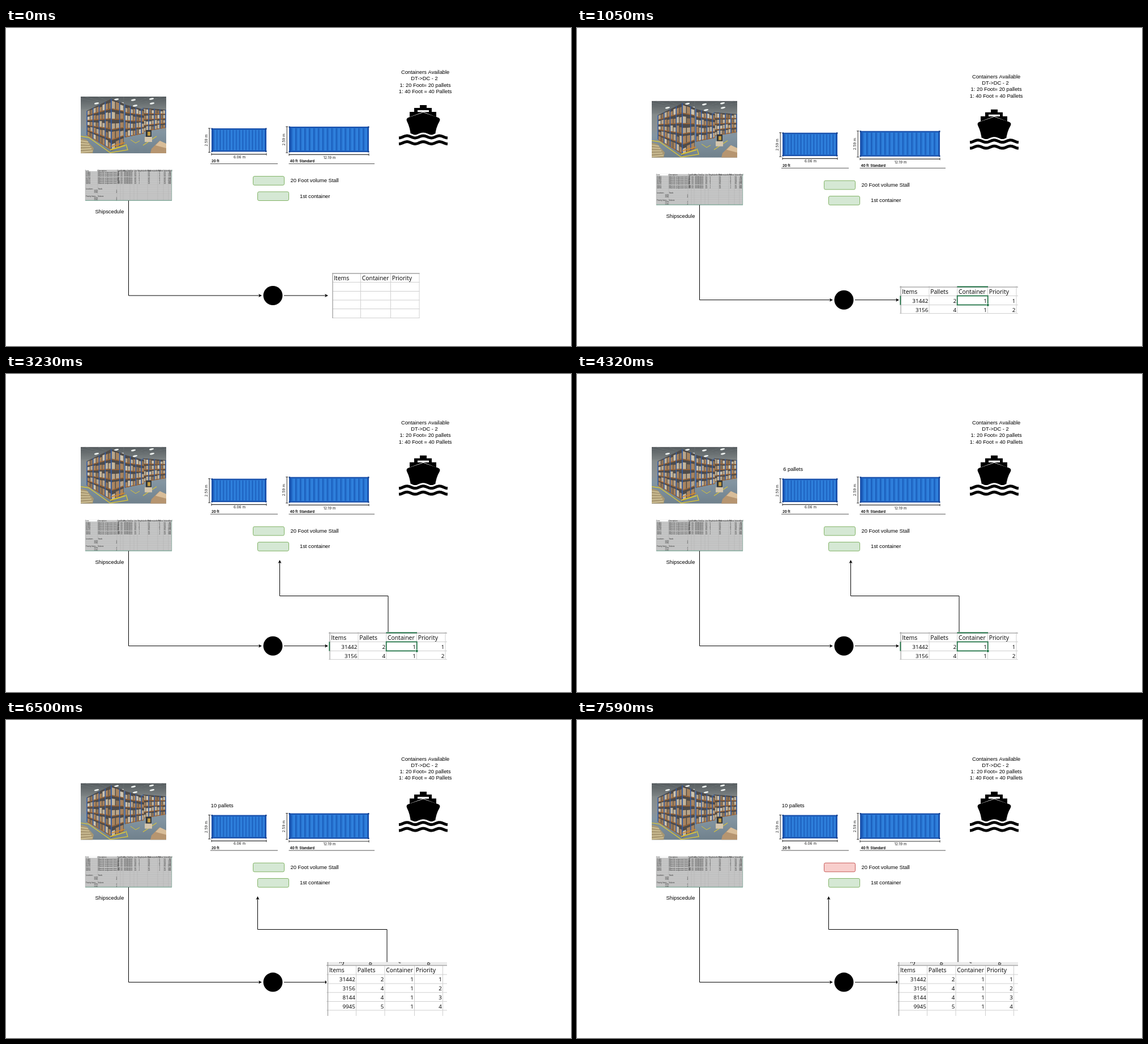
An HTML page with a canvas that plays this animation: 998 by 561 pixels, repeating every 8000 ms.

```html
<!DOCTYPE html>
<html lang="en">
<head>
<meta charset="utf-8">
<title>Container planning</title>
<style>
html, body { margin: 0; width: 100%; height: 100%; overflow: hidden; background: #fff; }
canvas { display: block; width: 100%; height: 100%; }
</style>
</head>
<body>
<canvas id="stage" width="998" height="561"></canvas>
<script>
const ctx = document.getElementById('stage').getContext('2d');
const LOOP = 8000;
const LABEL = '9.33px "Liberation Sans", Arial, sans-serif';
const HEAD = '10.4px "Open Sans", sans-serif';
const CELL = '9.8px "Open Sans", sans-serif';
const GRID = '#d0d0d0', EXCEL = '#217346';

// ---- helpers ----
function rect(x, y, w, h, color) {
  ctx.fillStyle = color;
  ctx.fillRect(x, y, w, h);
}
function trace(points) {
  ctx.beginPath();
  points.forEach(([x, y]) => ctx.lineTo(x, y));
}
function line(points, color = '#000', width = 1) {
  trace(points);
  ctx.strokeStyle = color;
  ctx.lineWidth = width;
  ctx.stroke();
}
function poly(points, color) {
  trace(points);
  ctx.closePath();
  ctx.fillStyle = color;
  ctx.fill();
}
function text(str, x, y, font = LABEL, align = 'left', color = '#000') {
  ctx.font = font;
  ctx.textAlign = align;
  ctx.fillStyle = color;
  ctx.fillText(str, x, y);
}
function arrow(points) {
  const [x, y] = points[points.length - 1], [px, py] = points[points.length - 2];
  const angle = Math.atan2(y - py, x - px);
  const back = [x - 4 * Math.cos(angle), y - 4 * Math.sin(angle)];
  line([...points.slice(0, -1), back]);
  ctx.save();
  ctx.translate(x, y);
  ctx.rotate(angle);
  poly([[0, 0], [-6, -3], [-4.4, 0], [-6, 3]], '#000');
  ctx.restore();
}
function randomizer(seed) {
  return () => (seed = (seed * 16807) % 2147483647) / 2147483647;
}
const mix = (a, b, t) => a + (b - a) * t;

// ---- warehouse picture ----
function rack([x0, top0, bottom0], [x1, top1, bottom1], cols, rows, random) {
  const at = (u, v) => [mix(x0, x1, u), mix(mix(top0, top1, u), mix(bottom0, bottom1, u), v)];
  const quad = (u, v, w, h) => [at(u, v), at(u + w, v), at(u + w, v + h), at(u, v + h)];
  const tones = ['#b9a58a', '#d0c4ae', '#a98560', '#c3b59c', '#8f7457'];
  poly(quad(0, 0, 1, 1), '#4f4b49');
  for (let r = 0; r < rows; r++) {
    for (let c = 0; c < cols; c++) {
      const low = 0.15 + random() * 0.25;
      const tone = tones[Math.floor(random() * tones.length)];
      poly(quad((c + 0.1) / cols, (r + low) / rows, 0.8 / cols, (0.9 - low) / rows), tone);
    }
    line([at(0, (r + 0.95) / rows), at(1, (r + 0.95) / rows)], '#a86a35', 1.3);
  }
  for (let c = 0; c <= cols; c += 2) line([at(c / cols, 0), at(c / cols, 1)], '#2f5fb0', 1.4);
}
function warehouse(x, y) {
  const random = randomizer(77);
  ctx.save();
  ctx.translate(x, y);
  ctx.beginPath();
  ctx.rect(0, 0, 151, 100);
  ctx.clip();
  const air = ctx.createLinearGradient(0, 0, 0, 100);
  air.addColorStop(0, '#4d5356');
  air.addColorStop(0.25, '#858b8b');
  air.addColorStop(0.5, '#8b9296');
  air.addColorStop(0.62, '#8395a2');
  air.addColorStop(1, '#70818c');
  rect(0, 0, 151, 100, air);
  for (let i = 0; i < 9; i++) {
    line([[75, 20], [i * 23 - 16, 0]], '#697073', 0.8);
    line([[0, i * 2.6], [151, i * 2.4]], '#737a7c', 0.6);
  }
  for (const [lx, ly] of [[72, 12], [63, 5], [126, 12], [125, 4], [96, 16], [28, 12], [93, 6]]) {
    ctx.beginPath();
    ctx.ellipse(lx, ly, 4.2, 1.5, -0.2, 0, 7);
    ctx.fillStyle = '#eef2f0';
    ctx.fill();
  }
  rack([110, 20, 62], [150, 23, 55], 8, 4, random);
  rack([78, 14, 72], [112, 23, 65], 7, 4, random);
  rack([11, 25, 68], [54, 4, 94], 8, 5, random);
  rack([54, 4, 96], [76, 12, 84], 3, 5, random);
  const yellow = '#d9c438';
  line([[0, 70], [14, 72], [52, 99], [83, 94], [80, 84]], yellow, 1.4);
  line([[52, 94], [79, 86]], yellow, 2);
  line([[54, 88], [78, 81]], '#d48a2c', 1.5);
  line([[88, 76], [97, 82], [104, 78]], yellow, 1);
  line([[110, 86], [134, 70]], yellow, 1.2);
  rect(115, 59, 10, 13, '#34373a');
  rect(118, 62, 5, 7, '#c39a3e');
  rect(113, 71, 13, 9, '#d4c6ad');
  poly([[0, 73], [10, 76], [23, 91], [21, 100], [0, 100]], '#a99872');
  for (let i = 0; i < 5; i++) line([[0, 78 + i * 5], [13 + i * 2, 80 + i * 4]], '#d0c297', 1.8);
  poly([[125, 92], [139, 78], [151, 84], [151, 100], [123, 100]], '#b69570');
  poly([[132, 86], [140, 78], [151, 83], [151, 91]], '#d8bd99');
  ctx.restore();
}

// ---- spreadsheet thumbnail ----
function schedule(x, y) {
  const pitch = 3.2, columns = [0, 22, 56, 62, 67, 79, 86, 92, 110, 128, 138, 147];
  const tiny = (str, tx, row, align) =>
    text(str, x + tx, y + row * pitch + 2.7, '2.8px "Open Sans", sans-serif', align, '#222');
  rect(x, y, 153, 54.5, '#c6c6c6');
  rect(x, y, 21, 2.8, '#fff');
  for (let r = 1; r < 18; r++) line([[x, y + r * pitch], [x + 153, y + r * pitch]], '#aeb2b0', 0.45);
  for (const c of columns) line([[x + c, y], [x + c, y + 54]], '#aeb2b0', 0.45);
  const heads = ['Item', 'Description', 'Type', 'Mode', 'Ship Date', 'Qty', 'Lbs', 'Weight/pallet (lbs)',
    'Volume/pallet (ft)', 'Pallets', 'Volume', 'Total'];
  heads.forEach((h, i) => tiny(h, columns[i] + 0.5, 0));
  for (let r = 1; r < 8; r++) {
    tiny(String(31000 + r * 442), 1, r);
    tiny('Material component item ' + r * 17, 22.5, r);
    tiny('DT', 57, r);
    tiny('DC', 62.5, r);
    tiny('08/08/2022', 68.5, r);
    columns.slice(6).forEach((c, i) => tiny(String(r * 31 % (i % 2 ? 9 : 97) + 1), c + 4, r, 'right'));
    tiny(String(r * 53 + 12), 151, r, 'right');
  }
  [[10, 'Locations', 'Totals'], [14, 'Priority Items', 'Volume']].forEach(([row, a, b]) => {
    tiny(a, 1, row);
    tiny(b, 22.5, row);
    for (let i = 1; i < 3; i++) {
      tiny(String(3156 + i * 97), 22, row + i, 'right');
      tiny(String(i * 2), 56, row + i, 'right');
    }
  });
  line([[x, y + 54.2], [x + 153, y + 54.2]], '#5d9b83', 0.9);
  line([[x + 152.7, y], [x + 152.7, y + 54]], '#7caa97', 0.7);
}

// ---- shipping container with its dimensions ----
function container(x, y, w, h, ribs, dims) {
  const dimFont = '6.5px Inter, sans-serif', gray = '#333';
  rect(x, y, w, h, '#1b53ae');
  rect(x + 3, y + 2.5, w - 6, h - 5, '#2f80dc');
  const pitch = (w - 6) / ribs;
  for (let i = 0; i < ribs; i++) {
    rect(x + 3 + i * pitch, y + 3, pitch * 0.28, h - 6, '#1c5fbd');
    rect(x + 3 + (i + 0.28) * pitch, y + 3, pitch * 0.2, h - 6, '#2670cc');
  }
  for (const px of [x - 0.5, x + w - 2]) {
    rect(px, y - 0.5, 2.5, 2.5, '#153f8a');
    rect(px, y + h - 2, 2.5, 2.5, '#153f8a');
  }
  const left = x - 3.8, below = y + h + 4.4;
  line([[left, y], [left, y + h + 1]], gray);
  line([[left - 2, y], [left + 2, y]], gray);
  line([[left - 2, y + h + 1], [left + 2, y + h + 1]], gray);
  line([[x, below], [x + w, below]], gray, 1.2);
  line([[x, below - 2], [x, below + 2]], gray);
  line([[x + w, below - 2], [x + w, below + 2]], gray);
  text(dims.length, x + w / 2 + 1, dims.lengthY, dimFont, 'center', '#222');
  ctx.save();
  ctx.translate(left - 3.3, y + h / 2 + 0.5);
  ctx.rotate(-Math.PI / 2);
  text('2.59 m', 0, 0, dimFont, 'center', '#222');
  ctx.restore();
  text(dims.name, dims.nameX, 237.4, 'bold 6px Inter, sans-serif', 'left', '#111');
  line([[dims.nameX - 2, 239.5], [dims.end, 239.5]], '#555', 1);
}

// ---- ship ----
function wave(y, color, width) {
  const points = [];
  for (let x = 694; x <= 780; x++) points.push([x, y - 1.9 * Math.cos((x - 694) / 86 * 6 * Math.PI + Math.PI)]);
  line(points, color, width);
}
function ship() {
  poly([[731, 136], [743, 136], [743, 141], [752, 141], [752, 148], [760, 148], [760, 157],
    [737, 148], [713, 157], [713, 148], [721, 148], [721, 141], [731, 141]], '#000');
  rect(727, 145, 20, 3.2, '#fff');
  ctx.fillStyle = '#000';
  ctx.fill(new Path2D('M737 149 L762 157.5 Q768 159 766 164 Q759 176 758 190 H715 Q714 176 708 164 Q706 159 712 157.5Z'));
  wave(190.5, '#fff', 8);
  wave(192, '#000', 5);
  wave(202.5, '#000', 5);
}

function badge(x, y, fill, stroke) {
  ctx.beginPath();
  ctx.roundRect(x, y, 55, 15.6, 2.4);
  ctx.fillStyle = fill;
  ctx.fill();
  ctx.strokeStyle = stroke;
  ctx.lineWidth = 1;
  ctx.stroke();
}

function diagram({ label, stalled }) {
  ['Containers Available', 'DT->DC - 2', '1: 20 Foot= 20 pallets', '1: 40 Foot = 40 Pallets']
    .forEach((str, i) => text(str, i === 1 ? 739 : 740.6, 81.2 + i * 11.2, LABEL, 'center'));
  ship();
  warehouse(132, 121);
  schedule(140, 250);
  text('Shipscedule', 157.5, 326.8);
  container(363, 177, 97, 41.3, 16, { length: '6.06 m', lengthY: 229.6, name: '20 ft', nameX: 363, end: 480 });
  container(500, 174, 141, 45, 17, { length: '12.19 m', lengthY: 230.8, name: '40 ft  Standard', nameX: 501.5, end: 651 });
  if (label) text(label, 381.7, 163, LABEL, 'center');
  badge(436.5, 261.6, stalled ? '#f8cecc' : '#d5e8d4', stalled ? '#c85a58' : '#82b366');
  badge(444.5, 288.9, '#d5e8d4', '#82b366');
  text('20 Foot volume Stall', 502.6, 272.3);
  text('1st container', 519, 299.6);
  arrow([[216.5, 304.5], [216.5, 472], [452, 472]]);
  ctx.beginPath();
  ctx.arc(471.5, 472, 17, 0, 7);
  ctx.fillStyle = '#000';
  ctx.fill();
  arrow([[491, 472], [569, 472]]);
}

// ---- result tables ----
const FULL = ['Items', 'Pallets', 'Container', 'Priority'];
function table({ box: [x0, y0, x1, y1], cols, rows, heads, data = [] }) {
  rect(x0, y0, x1 - x0, y1 - y0, '#fff');
  for (const c of cols) line([[c, y0], [c, y1]], GRID);
  for (const r of rows) line([[x0, r], [x1, r]], GRID);
  heads.forEach((h, i) => text(h, cols[i] + 2.2, rows[0] + 12.4, HEAD));
  data.forEach((record, r) => record.forEach((value, i) =>
    text(value, cols[i + 1] - 1.7, rows[r + 1] + 12.2, CELL, 'right')));
}
function emptyTable() {
  table({ box: [576.5, 432, 730.5, 512], cols: [577, 626.5, 679.5, 730],
    rows: [433, 448.5, 464.5, 480, 495.5, 511.5], heads: ['Items', 'Container', 'Priority'] });
  line([[576.5, 433], [730.5, 433]], '#8a8a8a', 1.2);
  line([[577, 432], [577, 512]], '#9a9a9a', 1);
}
function twoRowTable() {
  table({ box: [570, 455, 779, 504], cols: [572, 622, 671.7, 725.5, 776], rows: [457, 472.5, 488.5, 503.5],
    heads: FULL, data: [[31442, 2, 1, 1], [3156, 4, 1, 2]] });
  line([[570, 457], [779, 457]], '#9a9a9a', 1.2);
  line([[572, 455], [572, 504]], '#a5a5a5', 1);
  line([[671.5, 456.5], [726, 456.5]], EXCEL, 1.8);
  line([[571.3, 472.5], [571.3, 488.5]], EXCEL, 1.8);
  ctx.strokeRect(671.7, 472.5, 54, 16);
  rect(723, 486, 5, 5, '#fff');
  rect(723.7, 486.7, 3.8, 3.8, EXCEL);
}
function oneRowTable() {
  table({ box: [569, 464, 787, 500], cols: [576, 626.5, 676.5, 728.8, 779.5], rows: [468, 483.5, 498],
    heads: FULL, data: [[31442, 2, 1, 1]] });
  rect(569, 464, 7, 19, '#e3e3e3');
  rect(569, 483.5, 7, 15.5, '#9fd2b5');
  line([[576, 467.7], [787, 467.7]], EXCEL, 1.6);
  line([[575, 498.3], [787, 498.3]], EXCEL, 1.8);
  line([[576, 467], [576, 499]], '#6ea488', 1);
}
function fourRowTable() {
  const cols = [568.5, 618.5, 669, 721.5, 771.5];
  table({ box: [566, 427, 779, 522], cols, rows: [433, 449, 465, 480.7, 496.5, 512], heads: FULL,
    data: [[31442, 2, 1, 1], [3156, 4, 1, 2], [8144, 4, 1, 3], [9945, 5, 1, 4]] });
  rect(566, 427, 213, 6, '#ececec');
  ctx.save();
  ctx.beginPath();
  ctx.rect(566, 427.3, 213, 5);
  ctx.clip();
  ['xy', 'g', 'c', 'g'].forEach((c, i) => text(c, (cols[i] + cols[i + 1]) / 2, 428.8, HEAD, 'center'));
  ctx.restore();
  line([[566, 433], [779, 433]], '#8f8f8f', 1.2);
  line([[568.5, 427], [568.5, 522]], '#8f8f8f', 1);
}

// ---- timeline ----
const one = { shift: 10.9, table: oneRowTable, route: [[678.5, 464], [678.5, 394], [444.5, 394], [444.5, 323]] };
const two = { shift: 7.7, table: twoRowTable, route: [[675, 455], [675, 391.5], [483.5, 391.5], [483.5, 328]] };
const four = { shift: -9.4, table: fourRowTable, route: [[673, 427], [673, 369.5], [444.5, 369.5], [444.5, 311]] };
const steps = [
  { from: 0, shift: 0, table: emptyTable },
  { from: 1050, shift: 7.7, table: twoRowTable },
  { from: 2140, ...one, label: '2 pallets' },
  { from: 3230, ...two },
  { from: 4320, ...two, label: '6 pallets' },
  { from: 5410, ...four, label: '6 pallets' },
  { from: 6500, ...four, label: '10 pallets' },
  { from: 7590, ...four, label: '10 pallets', stalled: true }
];

function draw(now) {
  const time = now % LOOP;
  const step = steps.filter(s => s.from <= time).pop();
  rect(0, 0, 998, 561, '#fff');
  ctx.save();
  ctx.translate(0, step.shift);
  diagram(step);
  ctx.restore();
  if (step.route) arrow(step.route);
  step.table();
}
const start = performance.now();
function tick() {
  draw(performance.now() - start);
  requestAnimationFrame(tick);
}
tick();
</script>
</body>
</html>
```
